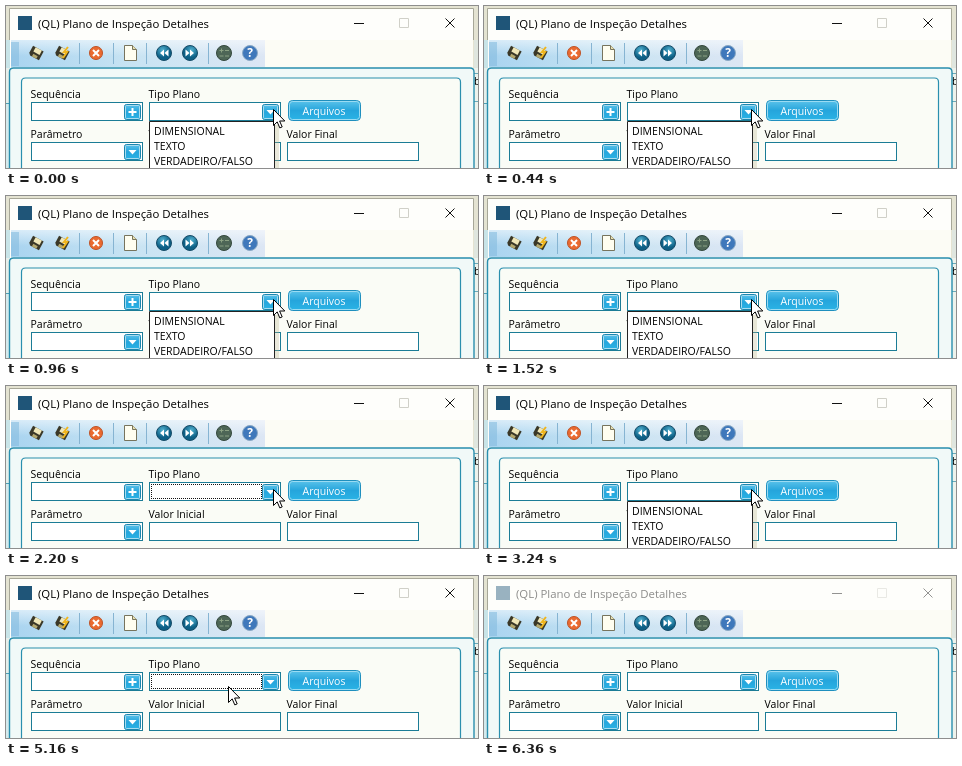
An HTML page for the animation above (6.4 s loop, 472x162 px).

```html
<!DOCTYPE html>
<html lang="pt">
<head>
<meta charset="utf-8">
<title>Plano de Inspeção</title>
<style>
html, body { margin: 0; width: 100%; height: 100%; overflow: hidden; background: #e4e3d2; }
svg { display: block; width: 472px; height: 162px; }
text { font: 10.5px "Open Sans", "Noto Sans", sans-serif; fill: #000; }
.title { font-size: 11.4px; }
.bar { animation: bar 6400ms step-end infinite; }
.list { animation: list 6400ms step-end infinite; }
.focus { animation: focus 6400ms step-end infinite; }
.cursor { animation: move 6400ms linear infinite, show 6400ms step-end infinite; }
.field { fill: #fff; stroke: #1b7c96; }
.sep { stroke: #86b4d2; }
.win { fill: none; stroke: #111; }
.off { fill: none; stroke: #d0d0c8; }

@keyframes bar { 0% { opacity: 1; } 98.125%, 100% { opacity: .45; } }
@keyframes list {
  0% { visibility: visible; }
  25.625% { visibility: hidden; }
  46.875% { visibility: visible; }
  72.5%, 100% { visibility: hidden; }
}
@keyframes focus {
  0% { visibility: hidden; }
  25.625% { visibility: visible; }
  46.875% { visibility: hidden; }
  72.5% { visibility: visible; }
  94.375%, 100% { visibility: hidden; }
}
@keyframes move {
  0%, 78.75% { transform: translate(267px, 103px); }
  80.625%, 94.37% { transform: translate(222px, 110px); }
  94.375%, 100% { transform: translate(332px, 36px); }
}
@keyframes show { 0% { visibility: visible; } 98.125%, 100% { visibility: hidden; } }
</style>
</head>
<body>
<svg viewBox="0 0 472 162">
  <defs>
    <linearGradient id="blue" x2="0" y2="1">
      <stop stop-color="#5cc3ea"/><stop offset=".5" stop-color="#25a5dc"/><stop offset="1" stop-color="#2bb4e6"/>
    </linearGradient>
    <linearGradient id="tools">
      <stop stop-color="#a9d4f0"/><stop offset=".5" stop-color="#c9e4f3"/><stop offset="1" stop-color="#dce6f4"/>
    </linearGradient>
    <linearGradient id="shine" x2="0" y2="1">
      <stop stop-color="#fff" stop-opacity=".55"/><stop offset=".6" stop-color="#fff" stop-opacity="0"/>
    </linearGradient>
    <radialGradient id="ball" cx=".4" cy=".3">
      <stop stop-color="#4fb0cf"/><stop offset="1" stop-color="#0d5f85"/>
    </radialGradient>
    <g id="btn">
      <rect x=".5" y=".5" width="16" height="15" rx="2" fill="url(#blue)" stroke="#1c86ae"/>
      <rect x="1.5" y="1.5" width="14" height="13" rx="1" fill="none" stroke="#a8dcf0"/>
    </g>
    <g id="drop"><use href="#btn"/><path d="M4.5 6h8l-4 4.5z" fill="#fff"/></g>
    <g id="disk" transform="rotate(28)">
      <path d="M-6-5H6V5H-4l-2-2z" fill="#3a3828"/>
      <path d="M-3-5h7v5h-7z" fill="#f0e7b8"/>
      <path d="M-2 2h5v3h-5z" fill="#b3a86e"/>
    </g>
    <g id="back">
      <circle r="7.5" fill="url(#ball)" stroke="#164c68"/>
      <path d="M0-3.5L-4 0 0 3.500zM4.500-3.500L.5 0l4 3.500z" fill="#fff"/>
    </g>
  </defs>

  <!-- desktop behind the window -->
  <rect width="472" height="162" fill="#e4e3d2"/>
  <rect y="34" width="5" height="28" fill="#c8e4e8"/>
  <rect y="62" width="4" height="36" fill="#e6efeb"/>
  <path d="M0 97.5h4" stroke="#4d9fb4"/>
  <rect y="98" width="4" height="64" fill="#d5eaed"/>
  <rect x="468" y="34" width="4" height="28" fill="#dfe6df"/>
  <rect x="468" y="62" width="4" height="100" fill="#edf2ec"/>
  <path d="M468 67.5h4M468 95.5h4" stroke="#69a9b8"/>
  <text x="468" y="79">bi</text>

  <!-- window -->
  <rect x="4" y="2" width="463" height="160" fill="#fefefb"/>
  <path d="M3.5 34V2.5h464V34" fill="none" stroke="#a7a798"/>
  <g class="bar">
    <rect x="12" y="10" width="14" height="14" fill="#1f5578"/>
    <text class="title" x="32" y="21.500">(QL) Plano de Inspeção Detalhes</text>
    <path class="win" d="M348 17.500h10M439.500 12.500l9 9m0-9l-9 9"/>
    <path class="off" d="M393.500 12.500h9v9h-9z"/>
  </g>

  <!-- toolbar -->
  <rect x="5" y="34" width="462" height="28" fill="#fcfcf5"/>
  <rect x="5" y="34" width="254" height="27" fill="url(#tools)"/>
  <rect x="5" y="34" width="254" height="27" fill="url(#shine)"/>
  <rect x="5" y="36" width="8" height="24" fill="#86bde0" opacity=".6"/>
  <path class="sep" d="M73.500 37v21M107.500 37v21M140.500 37v21M202.500 37v21"/>
  <use href="#disk" x="30" y="47" transform="translate(30 47)" style="x:0;y:0"/>
  <use href="#disk" transform="translate(56 47)"/>
  <path d="M62 41l-4 5h3l-4 6" fill="none" stroke="#f0b51d" stroke-width="2"/>
  <circle cx="90" cy="47" r="6.500" fill="#ea6a30" stroke="#bd5226"/>
  <path d="M87 44l6 6m0-6l-6 6" stroke="#fff" stroke-width="2"/>
  <path d="M118.500 39.500h8l4 4v11h-12z" fill="#fffef0" stroke="#77745d"/>
  <path d="M126.500 39.500v4h4" fill="#e8e0b0" stroke="#77745d"/>
  <use href="#back" transform="translate(158 47)"/>
  <use href="#back" transform="translate(184 47) scale(-1 1)"/>
  <circle cx="218" cy="47" r="7.500" fill="#4d6656" stroke="#34483d"/>
  <path d="M213.500 44.500h4m-2-2v4M219 44.500h4M213.500 50h4M219 50h4" stroke="#8aa183"/>
  <circle cx="244" cy="47" r="7.500" fill="#3f78bb" stroke="#8aa9c5"/>
  <text x="244" y="51" text-anchor="middle" style="font-size:12px;font-weight:700;fill:#fff">?</text>

  <!-- form -->
  <path d="M3.500 164V66q0-4 4-4H464q4 0 4 4v98" fill="#f1f9f8" stroke="#2a8fae" stroke-width="1.400"/>
  <path d="M15.500 164V76q0-4 4-4H450.500q4 0 4 4v88" fill="#fafcf6" stroke="#2a8fae" stroke-width="1.200"/>
  <text x="24.500" y="92">Sequência</text>
  <text x="142.500" y="92">Tipo Plano</text>
  <text x="24.500" y="132">Parâmetro</text>
  <text x="142.500" y="132">Valor Inicial</text>
  <text x="280.500" y="132">Valor Final</text>
  <g class="field">
    <rect x="25.500" y="96.500" width="111" height="18"/>
    <rect x="143.500" y="96.500" width="131" height="18"/>
    <rect x="25.500" y="136.500" width="111" height="18"/>
    <rect x="143.500" y="136.500" width="131" height="18"/>
    <rect x="281.500" y="136.500" width="131" height="18"/>
  </g>
  <use href="#btn" x="118" y="98"/>
  <path d="M122.500 106h8m-4-4v8" stroke="#fff" stroke-width="2"/>
  <use href="#drop" x="256" y="98"/>
  <use href="#drop" x="118" y="138"/>
  <rect x="282.500" y="94.500" width="72" height="20" rx="4" fill="url(#blue)" stroke="#1f8fbe"/>
  <rect x="283.500" y="95.500" width="70" height="18" rx="3" fill="none" stroke="#9bdcf3"/>
  <text x="318" y="109" text-anchor="middle" style="fill:#fff">Arquivos</text>

  <path class="focus" d="M145 98.500h111M145 112.500h111M145.500 100v12M255.500 100v12" fill="none" stroke="#111" stroke-dasharray="1 1"/>

  <g class="list">
    <rect x="269" y="119" width="4" height="43" fill="#b9b38a" opacity=".3"/>
    <path d="M143.500 164V115.500h125V164" fill="#fff" stroke="#222"/>
    <text x="148" y="129">DIMENSIONAL</text>
    <text x="148" y="144">TEXTO</text>
    <text x="148" y="159">VERDADEIRO/FALSO</text>
  </g>

  <path class="cursor" d="M.5 .5V16.500l3.700-3.600 2.600 6 2.400-1-2.600-5.900h5.200z" fill="#fff" stroke="#000"/>
</svg>
</body>
</html>
```
